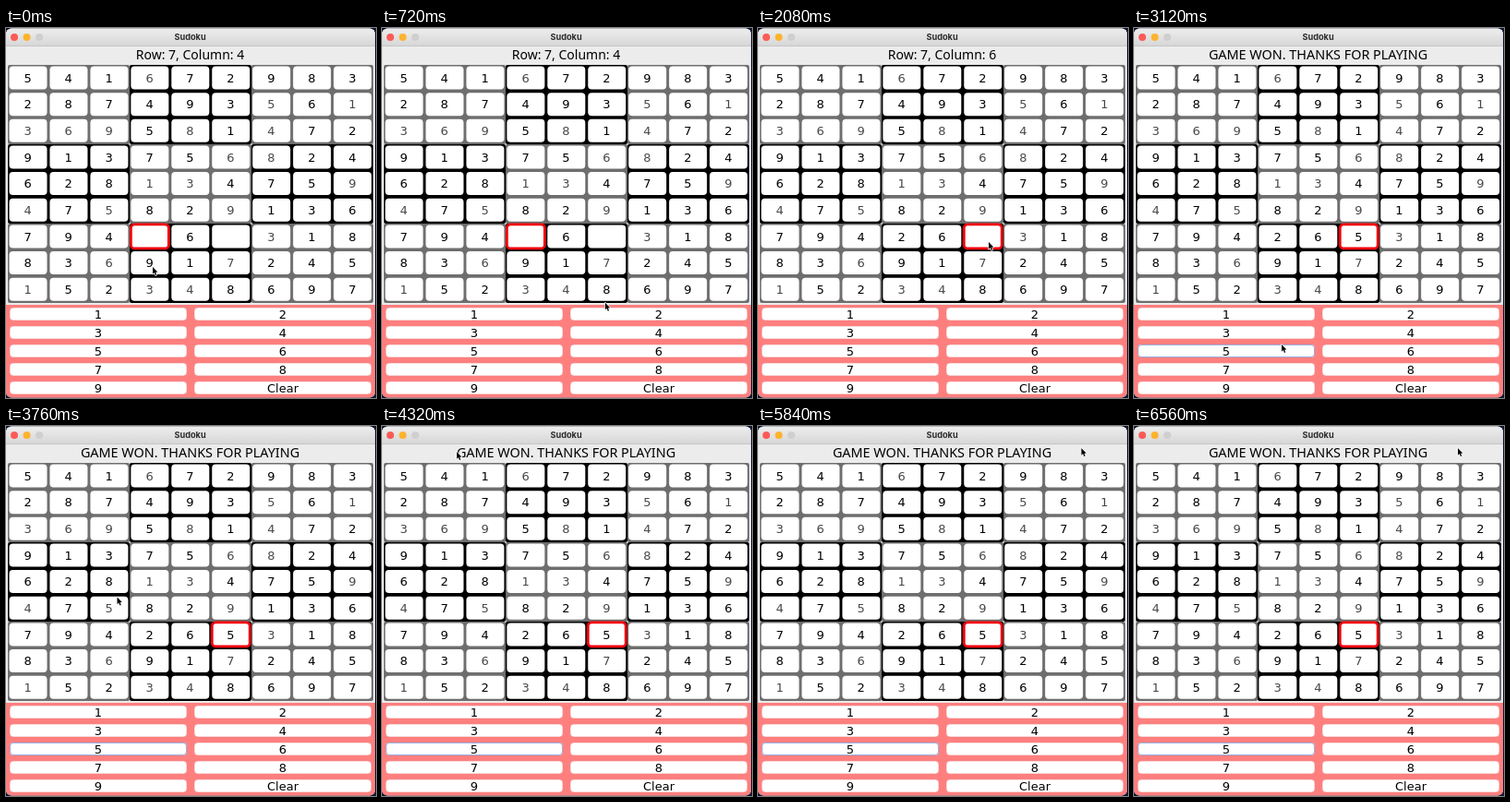
Recreate the animation shown at these times as an HTML page with a canvas. Size 401x401 px, loop 6.64 s.

```html
<!DOCTYPE html>
<html lang="en">
<head>
<meta charset="utf-8">
<title>Sudoku</title>
<style>
  html, body { margin: 0; width: 100%; height: 100%; overflow: hidden; background: #10152f; }
  canvas { display: block; width: 401px; height: 401px; }
</style>
</head>
<body>
<canvas id="stage"></canvas>
<script>
const LOOP = 6640, STEP = 80, SIZE = 401;
const canvas = document.getElementById('stage');
const ctx = canvas.getContext('2d');
const ratio = window.devicePixelRatio || 1;
canvas.width = canvas.height = Math.round(SIZE * ratio);
ctx.scale(ratio, ratio);

const DIGITS = '"DejaVu Sans", sans-serif';
const LABEL = '"Noto Sans", sans-serif';

const BOARD = [
  '541672983', '287493561', '369581472',
  '913756824', '628134759', '475829136',
  '794 6 318', '836917245', '152348697'
];
// Cells the player filled in are marked with x and drawn in grey.
const PLAYED = [
  '...x.....', '......x.x', 'xxx.x.x..',
  '.....xx..', '...xx...x', 'x.x..x...',
  '......x..', '..x..x...', 'x..xx....'
];
const BUTTONS = ['1', '2', '3', '4', '5', '6', '7', '8', '9', 'Clear'];

const FIRST_ENTRY = 1200, SECOND_PICK = 2000, SECOND_ENTRY = 3040;

// Pointer stops: time, x, y
const POINTER = [
  [0, 159, 259], [1040, 266, 309], [1360, 266, 309],
  [1920, 250, 232], [2160, 250, 232], [2880, 160, 343],
  [3200, 160, 343], [4320, 81, 28], [5120, 350, 24], [LOOP, 351, 24]
];

function box(x, y, w, h, r, fill, stroke, line = 1) {
  ctx.beginPath();
  ctx.roundRect(x, y, w, h, r);
  if (fill) { ctx.fillStyle = fill; ctx.fill(); }
  if (stroke) { ctx.strokeStyle = stroke; ctx.lineWidth = line; ctx.stroke(); }
}

function text(value, x, baseline, font, color = '#000') {
  ctx.font = font;
  ctx.fillStyle = color;
  ctx.textAlign = 'center';
  ctx.fillText(value, x, baseline);
}

function verticalGradient(top, bottom, from, to) {
  const gradient = ctx.createLinearGradient(0, top, 0, bottom);
  gradient.addColorStop(0, from);
  gradient.addColorStop(1, to);
  return gradient;
}

function drawWindow(status) {
  box(0, 0, SIZE, SIZE, 0, '#10152f');
  box(0, 0.5, 400, 400, 6, '#ececec');
  box(0, 0.5, 400, 19, [6, 6, 0, 0], verticalGradient(0, 20, '#eeeeee', '#d6d6d6'));
  box(0, 19, 400, 1, 0, '#c6c6c6');
  ['#fc5b57', '#fdb32e', '#cfcfcf'].forEach((color, i) => {
    ctx.beginPath();
    ctx.arc(9 + 13.5 * i, 10, 4, 0, 2 * Math.PI);
    ctx.fillStyle = color;
    ctx.fill();
  });
  text('Sudoku', 199.5, 13, 'bold 9.2px Inter, sans-serif', '#2c2c2c');
  const size = status.startsWith('GAME') ? 14.4 : 14;
  text(status, 199.5, 34, `${size}px ${LABEL}`);
}

function drawBoard(time) {
  for (let block = 0; block < 9; block++) {
    const x = 2 + 132 * (block % 3), y = 40 + 86 * Math.floor(block / 3);
    box(x, y, 132, 86, 2, block % 2 ? '#000' : '#6e6e6e');
  }
  const selected = time < SECOND_PICK ? 3 : 5;
  for (let row = 0; row < 9; row++) {
    for (let col = 0; col < 9; col++) {
      const x = 24 + 43.95 * col, y = 54 + 28.65 * row;
      const active = row === 6 && col === selected;
      box(x - 20.5, y - 12.5, 41, 25, 4, '#fff');
      if (active) box(x - 20.5, y - 13, 41, 26, 4, null, '#f5000c', 2.8);
      let digit = BOARD[row][col];
      if (row === 6 && col === 3 && time >= FIRST_ENTRY) digit = '2';
      if (row === 6 && col === 5 && time >= SECOND_ENTRY) digit = '5';
      const color = PLAYED[row][col] === 'x' ? '#484848' : '#000';
      text(digit, x - 0.3, y + 4.8, `13px ${DIGITS}`, color);
    }
  }
}

function drawButtons(time) {
  box(0, 300, 400, 100.5, [0, 0, 6, 6], '#ff7f7f');
  let focused = '';
  if (time >= FIRST_ENTRY && time < SECOND_PICK) focused = '2';
  if (time >= SECOND_ENTRY) focused = '5';
  BUTTONS.forEach((label, i) => {
    const x = 4 + 200 * (i % 2), y = 303 + 20 * Math.floor(i / 2);
    box(x, y, 192, 14, 4, '#fff', '#ee8585', 0.6);
    if (label === focused) box(x + 0.5, y + 0.5, 191, 13, 3.5, null, '#9aaee0');
    text(label, x + 96, y + 12, `13px ${DIGITS}`);
  });
}

function pointerAt(time) {
  const next = POINTER.findIndex(stop => stop[0] > time);
  const [t0, x0, y0] = POINTER[next - 1], [t1, x1, y1] = POINTER[next];
  const p = (time - t0) / (t1 - t0), eased = p * p * (3 - 2 * p);
  return [x0 + (x1 - x0) * eased, y0 + (y1 - y0) * eased];
}

function drawPointer([x, y]) {
  ctx.save();
  ctx.translate(x, y);
  ctx.scale(0.85, 0.85);
  ctx.beginPath();
  [[0, 0], [0, 9], [2, 7.2], [3.5, 10.6], [5, 10], [3.6, 6.7], [6.3, 6.5]]
    .forEach(point => ctx.lineTo(...point));
  ctx.closePath();
  ctx.lineJoin = 'round';
  ctx.strokeStyle = '#fff';
  ctx.lineWidth = 1.6;
  ctx.stroke();
  ctx.fillStyle = '#000';
  ctx.fill();
  ctx.restore();
}

function statusAt(time) {
  if (time >= SECOND_ENTRY) return 'GAME WON. THANKS FOR PLAYING';
  return `Row: 7, Column: ${time < SECOND_PICK ? 4 : 6}`;
}

function draw() {
  const time = Math.floor(performance.now() % LOOP / STEP) * STEP;
  drawWindow(statusAt(time));
  drawBoard(time);
  drawButtons(time);
  drawPointer(pointerAt(time));
  requestAnimationFrame(draw);
}

draw();
</script>
</body>
</html>
```
